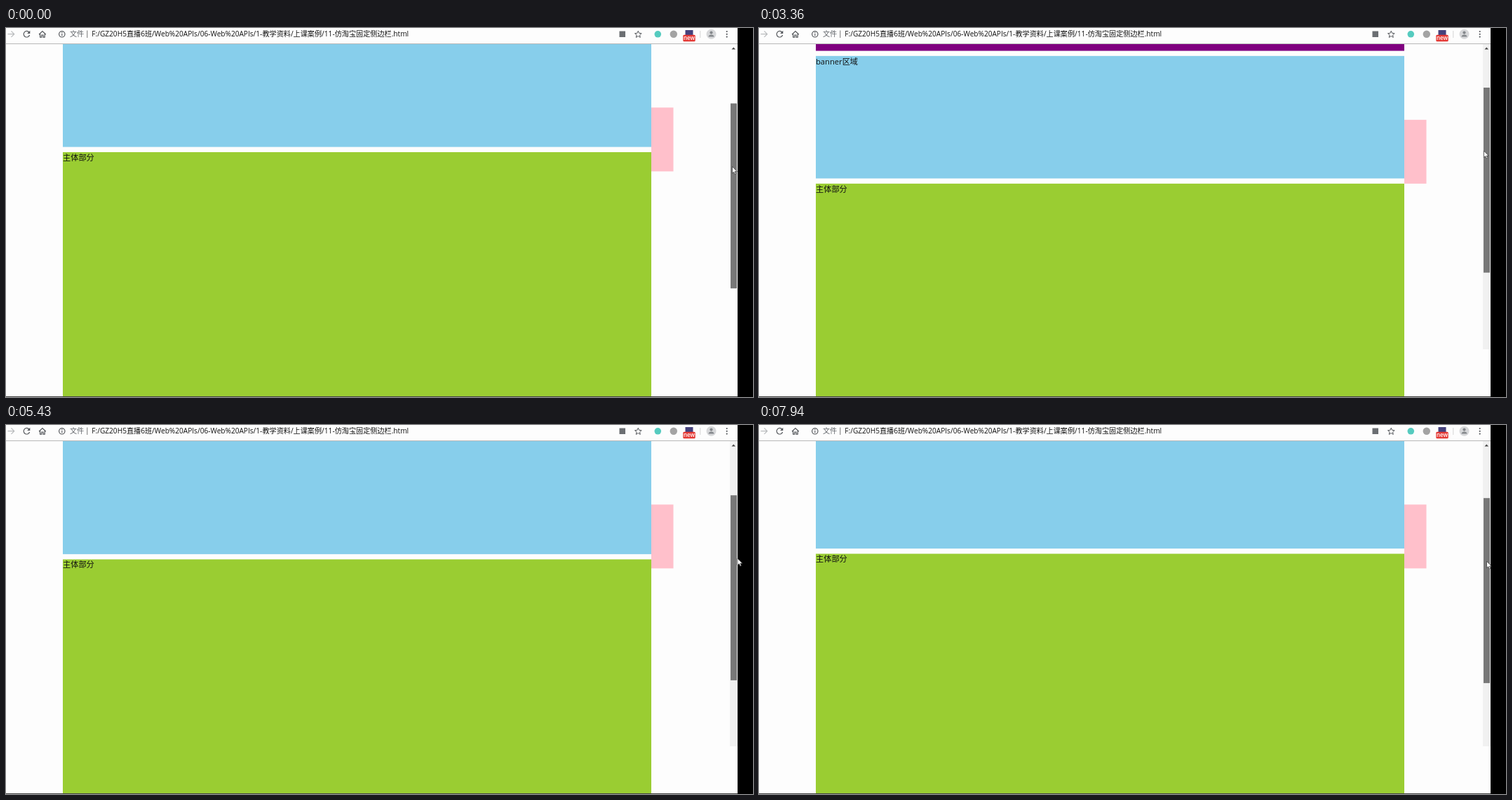
Write an HTML page that moves like this. It is 1065 by 526 pixels and loops after 8000 ms.

```html
<!DOCTYPE html>
<html lang="zh-CN">
<head>
<meta charset="utf-8">
<style>
  html, body { margin: 0; width: 100%; height: 100%; overflow: hidden; background: #fdfdfd; }
  svg { display: block; width: 1065px; height: 526px; }
  text { font: 11.2px "Open Sans", "Noto Sans", "Noto Sans CJK SC", "Noto Sans CJK", sans-serif; fill: #111; white-space: pre; }
  .bar text { font-size: 10.13px; }
  .line { fill: none; stroke: #55585c; stroke-width: 1.2; }
  #back text { fill: #8b7277; }
</style>
</head>
<body>
<svg viewBox="0 0 1065 526">
  <clipPath id="view"><rect y="22" width="1043" height="504"/></clipPath>
  <rect width="1065" height="526" fill="#fdfdfd"/>

  <g clip-path="url(#view)">
    <rect id="side" x="920" width="31.5" height="91" fill="#ffc0cb"/>
    <g id="back">
      <text x="920" y="187">返回</text>
      <text x="920" y="202">顶部</text>
    </g>
    <g id="page">
      <rect x="81" y="29.7" width="839" height="104.6" fill="#800080"/>
      <rect x="81" y="141.6" width="839" height="174.6" fill="#87ceeb"/>
      <rect x="81" y="323.6" width="839" height="700" fill="#9acd32"/>
      <text x="81" y="41.6">头部区域</text>
      <text x="81" y="153.5">banner区域</text>
      <text x="81" y="335.5">主体部分</text>
    </g>
    <rect id="track" x="1032" y="22" width="11" height="436" fill="#f1f1f1"/>
    <path id="up" d="M1034.5 30.5h5.5l-2.75-3z"/>
    <rect id="thumb" x="1033" width="9" height="263.7" fill="#787878"/>
  </g>

  <g class="bar">
    <path d="M0 22.5H1043" stroke="#b8b8b8"/>
    <path class="line" d="M2.5 8.7h9M7.5 4.5l4.2 4.2-4.2 4.2" style="stroke:#b9bbbd"/>
    <path class="line" d="M33 6.2a4.3 4.3 0 1 0 .6 3.8"/>
    <path d="M34.3 3.8v4.2h-4.2z" fill="#55585c"/>
    <path class="line" d="M47 9.2l4.9-4.6 4.9 4.6M48.6 8v5.1h2.2V10h2.2v3.1h2.2V8"/>
    <circle class="line" cx="79.8" cy="8.8" r="4.2"/>
    <path class="line" d="M79.8 8.2v3M79.8 6v1.2"/>
    <text x="91" y="12.4" style="fill:#5f6368">文件</text>
    <path d="M115.8 3.5v10.5" stroke="#777"/>
    <text x="122.3" y="12.4">F:/GZ20H5直播6班/Web%20APIs/06-Web%20APIs/1-教学资料/上课案例/11-仿淘宝固定侧边栏.html</text>

    <rect x="874.5" y="4.5" width="8.5" height="8.5" fill="#6b6e72"/>
    <path class="line" d="M901.3 4.2l1.4 3.2 3.4.3-2.6 2.3.8 3.4-3-1.8-3 1.8.8-3.4-2.6-2.3 3.4-.3z" style="stroke-width:1"/>
    <circle cx="929.3" cy="8.8" r="4.8" fill="#55cbbf"/>
    <circle cx="951.8" cy="8.8" r="5.2" fill="#a3a3a3"/>
    <rect x="968.5" y="3" width="11" height="8" fill="#45427d"/>
    <rect x="965.3" y="9.8" width="17.4" height="9.4" rx="1.5" fill="#e53935"/>
    <text x="974" y="17.2" text-anchor="middle" style="fill:#fff;font-size:8px;font-weight:600">new</text>
    <path d="M989.8 4v10" stroke="#d5d5d5"/>
    <circle cx="1005.5" cy="8.8" r="7" fill="#d7d8da"/>
    <circle cx="1005.5" cy="6.6" r="2.1" fill="#85888c"/>
    <path d="M1001.5 12.6c0-4 8-4 8 0z" fill="#85888c"/>
    <path d="M1027.7 5v8" stroke="#55585c" stroke-width="2.2" stroke-linecap="round" stroke-dasharray="0 3.8"/>
  </g>

  <path d="M0 525.5H1043" stroke="#444"/>
  <rect x="1043" width="22" height="526"/>
  <path id="cursor" d="M0 0v9.6l2.2-2 1.5 3.4 1.6-.7-1.5-3.2h3z" fill="#fff" stroke="#333" stroke-width=".7"/>
</svg>
<script>
const LOOP = 8000, STEP = 137;
const TOP = 34, BOTTOM = 194, RATIO = 1.995, GRIP = 90;
const STICK = 119.2, BACK = 301, TRACK_SHOWN = 1280;

// Turning points of the drag; it may overshoot the ends of the track.
const drags = [
  { at: 0, y: 107.5, x: 1035.5 },
  { at: 1160, y: 175.4, x: 1034 },
  { at: 1820, y: 206, x: 1033 },
  { at: 2250, y: 169.6, x: 1032.7 },
  { at: 3360, y: 85, x: 1033.4 },
  { at: 4190, y: 22, x: 1036 },
  { at: 4620, y: 19, x: 1037.5 },
  { at: 5430, y: 100.2, x: 1043 },
  { at: 6390, y: 158, x: 1041 },
  { at: 7080, y: 211, x: 1040 },
  { at: 7940, y: 104.2, x: 1037.5 },
  { at: LOOP, y: 104.2, x: 1037.5 }
];

const [side, back, page, track, up, thumb, cursor] =
  ["side", "back", "page", "track", "up", "thumb", "cursor"].map(id => document.getElementById(id));
const show = (node, on) => node.setAttribute("visibility", on ? "visible" : "hidden");
const move = (node, x, y) => node.setAttribute("transform", `translate(${x} ${y})`);
const mix = (a, b, p) => a + (b - a) * p;

// Straight drag between turning points, in even hard steps.
function pose(t) {
  const i = drags.findIndex(d => d.at > t);
  const a = drags[i - 1], b = drags[i], span = b.at - a.at;
  const steps = Math.max(1, Math.round(span / STEP));
  const p = Math.floor((t - a.at) / span * steps) / steps;
  return { x: mix(a.x, b.x, p), y: Math.min(BOTTOM, mix(a.y, b.y, p)) };
}

function draw(t) {
  const { x, y } = pose(t);
  const top = Math.max(TOP, y);
  const scroll = (top - TOP) * RATIO;
  move(page, 0, -scroll);
  thumb.setAttribute("y", top);
  side.setAttribute("y", 232.6 - Math.min(scroll, STICK));
  show(back, scroll >= BACK);
  show(track, t >= TRACK_SHOWN);
  up.setAttribute("fill", scroll ? "#444" : "#a3a3a3");
  move(cursor, x, y + GRIP);
}

const start = performance.now();
function tick() {
  draw((performance.now() - start) % LOOP);
  requestAnimationFrame(tick);
}
tick();
</script>
</body>
</html>
```
